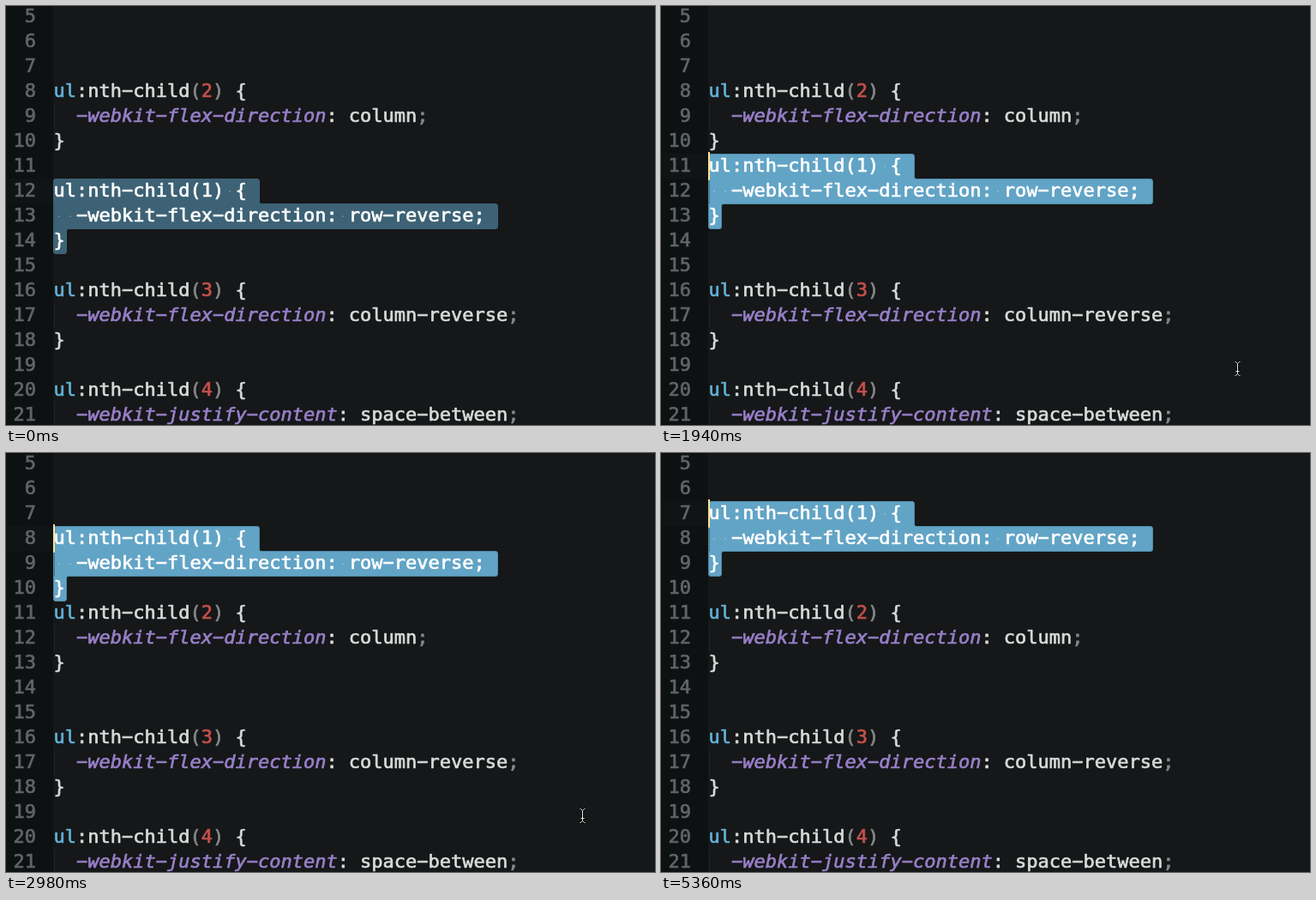
Animation of 757x488 px, one loop 5.46 s. Source, as an HTML page with a canvas:

```html
<!DOCTYPE html>
<html lang="en">
<head>
<meta charset="utf-8">
<title>Moving lines in an editor</title>
<style>
  html, body { margin: 0; width: 100%; height: 100%; overflow: hidden; background: #151718; }
  canvas { display: block; }
</style>
</head>
<body>
<canvas id="stage" width="757" height="488"></canvas>
<script>
const ctx = document.getElementById('stage').getContext('2d');
const LOOP = 5460, ROW = 29, CHAR = 13.245, LEFT = 55.5, GUTTER = 55;
const FOCUS = 890, PRESS = 1940, REPEAT = 300, BLINK = 1040;
const ENTER = 590, LEAVE = 4770, MOUSE_STEP = 145;
const FONT = '22px "DejaVu Sans Mono", monospace';

const rule = (n, prop, value) => [`ul:nth-child(${n}) {`, `  -webkit-${prop}: ${value};`, '}'];
const block = rule(1, 'flex-direction', 'row-reverse');
const above = ['', '', '', ...rule(2, 'flex-direction', 'column'), ''];
const below = ['', ...rule(3, 'flex-direction', 'column-reverse'), '',
               ...rule(4, 'justify-content', 'space-between')];

const rowTop = n => (n - 5) * ROW - 2;

// One key press moves the block a line up; holding the key repeats it.
function movesAt(t) {
  if (t < PRESS) return 0;
  const repeats = Math.floor((t - PRESS - 140) / REPEAT);
  return Math.min(5, 1 + Math.max(0, repeats));
}

// The caret blinks with a half-lit step, starting anew after each move.
function caretAlpha(t, moves) {
  if (t < FOCUS) return 0;
  const since = moves ? PRESS + 140 + (moves - 1) * REPEAT : FOCUS + 150;
  const phase = Math.max(0, t - since) % BLINK;
  if (phase < 290) return 1;
  return phase >= 440 && phase < 890 ? 0 : .5;
}

// The pointer settles quickly with a slight overshoot, then leaves slowing down.
function mousePlace(t) {
  if (t < LEAVE) {
    const k = Math.floor((t - ENTER) / 150);
    return [672 + 22 * .18 ** k, 422 - 30 * (-.1) ** k];
  }
  const k = 1 + Math.floor((t - LEAVE) / MOUSE_STEP);
  return [672 + 25 * k - 3.5 * k * k, 422 + 42 * k - 6 * k * k];
}

function rect(color, x, y, w, h) {
  ctx.fillStyle = color;
  ctx.fillRect(x, y, w, h);
}

// The editor's hyphen is as wide as a minus sign; a thin stroke adds weight.
function write(text, x, y, color, italic) {
  const shown = text.replaceAll('-', '\u2212');
  ctx.font = (italic ? 'italic ' : '') + FONT;
  ctx.fillStyle = ctx.strokeStyle = color;
  ctx.lineWidth = .7;
  ctx.lineJoin = 'round';
  ctx.fillText(shown, x, y + 21);
  ctx.strokeText(shown, x, y + 21);
}

function guide(y, color) {
  for (let i = 0; i < ROW; i += 2) rect(color, 56, y + i, 1, 1);
}

function tokenColor(token) {
  if (token === 'ul') return '#61b1d8';
  if (token.startsWith('-webkit')) return '#987fc8';
  if (/\d/.test(token)) return '#c4504b';
  return /[();]/.test(token) ? '#858889' : '#d9dada';
}

function codeLine(text, y) {
  if (text.startsWith(' ')) guide(y, '#2b2d2e');
  for (const m of text.matchAll(/^ul|-webkit[\w-]+|[\d();]|[^\d();]/g)) {
    const token = m[0];
    write(token, LEFT + m.index * CHAR, y, tokenColor(token), token.startsWith('-webkit'));
  }
}

// One outline around all rows; each row but the last includes its line break.
function selection(top, fill, border) {
  const x = GUTTER + .5, y = top + .5, bottom = y + block.length * ROW;
  const corners = [[x, y]];
  block.forEach((text, i) => {
    const chars = text.length + (i < block.length - 1);
    const end = Math.round(LEFT + chars * CHAR + 2) - .5;
    const narrower = i > 1 ? 1 : 0;
    corners.push([end, y + i * ROW], [end, y + (i + 1) * ROW]);
  });
  corners.push([x, bottom]);

  ctx.beginPath();
  ctx.moveTo(x, y + ROW);
  corners.forEach((c, i) => ctx.arcTo(...c, ...(corners[i + 1] ?? [x, y]), 2.5));
  ctx.closePath();
  ctx.fillStyle = fill;
  ctx.strokeStyle = border;
  ctx.lineWidth = 1;
  ctx.fill();
  ctx.stroke();
}

function selectedLine(text, y) {
  if (text.startsWith(' ')) guide(y, '#2c4a58');
  write(text, LEFT, y, '#fff');
  [...text].forEach((c, k) => {
    if (c === ' ') rect('#ffffff30', Math.round(LEFT + (k + .5) * CHAR) - 1, y + 14, 2, 2);
  });
}

function mouse(x, y) {
  ctx.save();
  ctx.translate(Math.round(x) + .5, Math.round(y) + .5);
  const beam = new Path2D('M-3-8H-2L0-6L2-8H3M0-6V6M-3 8H-2L0 6L2 8H3M-2 3H2');
  for (const [color, width] of [['#0008', 3], ['#e8e8e8', 1]]) {
    ctx.strokeStyle = color;
    ctx.lineWidth = width;
    ctx.stroke(beam);
  }
  ctx.restore();
}

function draw(t) {
  const moves = movesAt(t), first = 12 - moves, top = rowTop(first);
  const lines = [...above.slice(0, first - 5), ...block, ...above.slice(first - 5), ...below];

  rect('#151718', 0, 0, 757, 488);
  rect('#0d1112', 0, 0, GUTTER, 488);
  rect('#111415', 0, top, GUTTER, ROW);
  if (t < FOCUS) selection(top, '#3d6275', '#3d6275');
  else selection(top, '#62a4c6', '#4f89a6');

  lines.forEach((text, i) => {
    const n = i + 5, y = rowTop(n);
    const selected = n >= first && n < first + block.length;
    write(String(n).padStart(2), 8.4, y, '#606566');
    (selected ? selectedLine : codeLine)(text, y);
  });

  ctx.globalAlpha = caretAlpha(t, moves);
  rect('#fbe29a', GUTTER, top - 2, 2, 33);
  ctx.globalAlpha = 1;
  if (t >= ENTER && t < LEAVE + 3 * MOUSE_STEP) mouse(...mousePlace(t));
}

const start = performance.now();
function frame() {
  draw((performance.now() - start) % LOOP);
  requestAnimationFrame(frame);
}
frame();
</script>
</body>
</html>
```
